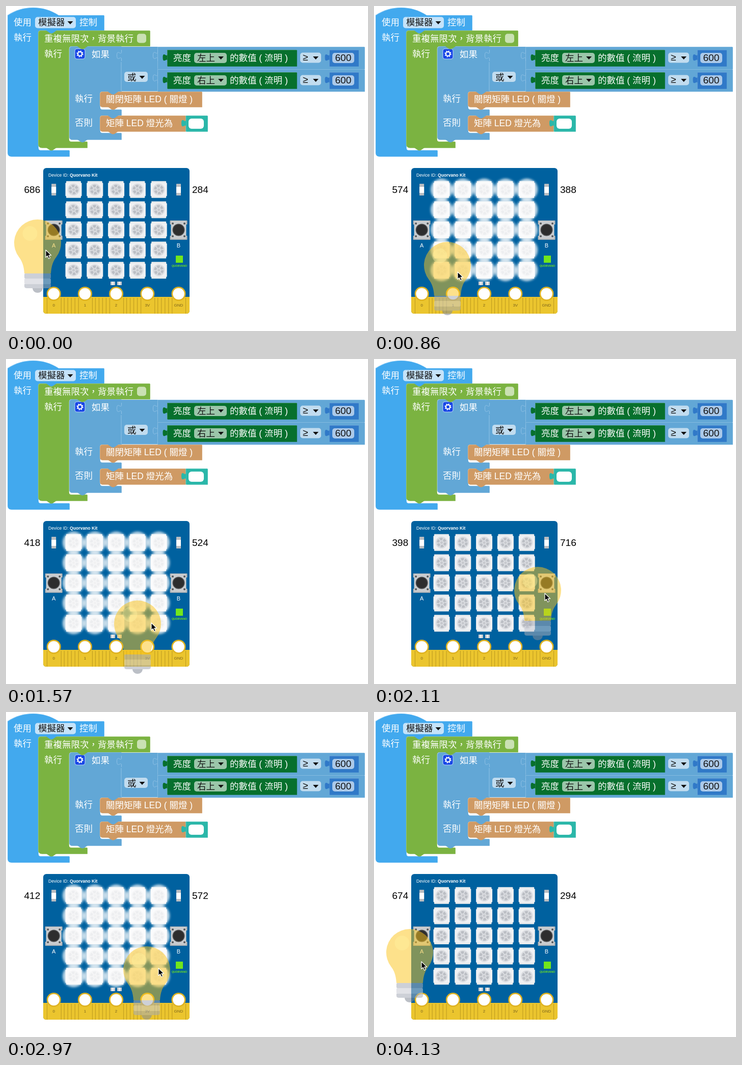
Animation, 710 px wide and 638 px high, one loop 4230 ms. Source, as an HTML page:

```html
<!DOCTYPE html>
<html lang="zh-Hant">
<head>
<meta charset="utf-8">
<style>
html, body { margin: 0; width: 100%; height: 100%; overflow: hidden; background: #fff; }
svg { display: block; font-family: "Liberation Sans", "Noto Sans CJK TC", "Noto Sans CJK", sans-serif; font-size: 17.5px; font-weight: 500; }
</style>
</head>
<body>
<svg id="stage" width="710" height="638" viewBox="0 0 710 638"></svg>
<script>
const BLUE = '#42a9ee', GREEN = '#7bb341', STEEL = '#62a7d6', FOREST = '#07702d',
      NUM = '#3079c8', TAN = '#cf9a64', TEAL = '#2bb7a9', BOARD = '#00619f', GOLD = '#ebc52e';

const rect = (x, y, w, h, fill, r = 0, extra = '') =>
  `<rect x="${x}" y="${y}" width="${w}" height="${h}" rx="${r}" fill="${fill}" ${extra}/>`;
const circle = (x, y, r, fill, extra = '') =>
  `<circle cx="${x}" cy="${y}" r="${r}" fill="${fill}" ${extra}/>`;
const path = (d, fill, extra = '') => `<path d="${d}" fill="${fill}" ${extra}/>`;
const text = (x, y, s, fill = '#fff', extra = '') =>
  `<text x="${x}" y="${y}" fill="${fill}" ${extra}>${s}</text>`;
const each = (list, draw) => list.map(draw).join('');

// Scratch-like block parts: a light upper-left rim on each block
const block = (d, fill) =>
  path(d, fill) + path(d, '#fff', 'opacity=".28"') + path(d, fill, 'transform="translate(.8 .8)"');
const boxBlock = (x, y, w, h, fill) => block(`M${x} ${y}h${w}v${h}h${-w}z`, fill);
const notch = (x, y, fill) => path(`M${x + 15} ${y - .6}h22l-8 5.6q-3 1.5-6 0z`, fill);
const plug = (x, y, fill, extra = '') =>
  path(`M${x + .5} ${y + 7}v4c0 9-9-7-9 7s9-1 9 7v4`, fill, extra);
const arrow = (x, y, fill = '#111') => path(`M${x} ${y}h11l-5.5 6z`, fill);
const wide = s => `&#160;(&#160;${s}&#160;)`;

function cBlock(x, top, right, head, footTop, bottom, footRight, fill, start) {
  return block(`${start || `M${x} ${top + 5}q0-5 5-5`}H${right}V${head}H${x + 65}q-5 0-5 5V${footTop - 5}
    q0 5 5 5H${footRight}V${bottom}H${x + 7}q-7 0-7-7z`, fill);
}

function comparison(y, place) {
  return boxBlock(297, y, 406, 43.4, STEEL) +
    plug(297, y - 1, 'none', 'stroke="#90c2e6"') +
    boxBlock(316, y + 6, 254, 32, FOREST) + plug(316, y + 3, FOREST) +
    text(328, y + 28, '亮度') +
    rect(369, y + 12, 64, 20, '#9bc6aa', 5) + text(375, y + 28, place, '#111') + arrow(416, y + 19) +
    text(439, y + 28, '的數值' + wide('流明')) +
    rect(577, y + 11.5, 41, 20, '#c1dcef', 5) + text(582, y + 27, '≥', '#111', 'font-size="19"') +
    arrow(602, y + 19) +
    boxBlock(634, y + 6, 57, 32, NUM) + plug(634, y + 3, NUM) +
    rect(640, y + 12, 43, 20, '#abc9e9', 5) + text(645.5, y + 28, '600', '#111', 'font-size="19"');
}

function blocks() {
  return cBlock(3, 18, 192, 47.5, 283, 295, 124, BLUE, 'M3 18c30-20 70-20 100 0') +
    text(15, 38, '使用') + rect(57, 21.5, 80, 22, '#c5e3fa', 5) +
    text(63, 38, '模擬器', '#111') + arrow(120.5, 30) + text(144, 38, '控制') + text(15, 68, '執行') +

    cBlock(63, 48, 282, 78.5, 266, 278, 159, GREEN) +
    text(75, 70, '重複無限次，背景執行') + rect(257, 54.5, 18, 18, '#cae1b3', 5) + text(75, 100, '執行') +

    block(`M124 84q0-5 5-5H226V167.5H189q-5 0-5 5V198q0 5 5 5H226V215H189q-5 0-5 5V244q0 5 5 5H226V262H129q-5 0-5-5z`, STEEL) +
    rect(226, 80, 72, 87.4, STEEL) +
    path('M226 167V110', 'none', 'stroke="#90c2e6"') +
    plug(226, 79, 'none', 'stroke="#90c2e6"') +
    rect(135, 84, 20, 20, '#1746e6', 4, 'stroke="#b9d2fa"') +
    circle(145, 94, 4, 'none', 'stroke="#fff" stroke-width="2"') +
    circle(145, 94, 5.6, 'none', 'stroke="#fff" stroke-width="2" stroke-dasharray="2.2"') +
    text(168, 100.5, '如果') +
    comparison(80, '左上') + comparison(124, '右上') +
    rect(232, 129, 46, 20, '#c1dcef', 5) + text(238, 146, '或', '#111') + arrow(261.5, 137) +
    text(135, 188, '執行') + text(135, 235, '否則') +

    block('M184 173q0-5 5-5H384V198H189q-5 0-5-5z', TAN) + text(196, 189, '關閉矩陣 LED' + wide('關燈')) +
    block('M184 220q0-5 5-5H352V246H189q-5 0-5-5z', TAN) + text(196, 236, '矩陣 LED 燈光為') +
    boxBlock(352.5, 215, 42.5, 31, TEAL) + plug(352.5, 212, TEAL) + rect(358, 221, 30, 20, '#fff', 6) +

    notch(63, 48, BLUE) + notch(124, 79, GREEN) + notch(184, 168, STEEL) + notch(184, 215, STEEL) +
    notch(184, 198, TAN) + notch(184, 246, TAN) + notch(124, 262, STEEL) + notch(63, 278, GREEN);
}

const cells = Array.from({ length: 25 }, (_, i) => [132.5 + 41.8 * (i % 5), 360.3 + 39.6 * Math.floor(i / 5)]);
const pins = ['0', '1', '2', '3V', 'GND'].map((name, i) => [93.7 + 61.2 * i, name]);

const button = (x, label) =>
  each([421, 451], y => rect(x - 17, y, 34, 8, '#aeb2b6', 1)) +
  rect(x - 15, 422, 30, 35, '#c9cccf', 1) +
  each([-11.5, 11.5], dx => each([427, 452], y => circle(x + dx, y, 2, '#55585b'))) +
  circle(x, 439.5, 12, '#4e4f51') + circle(x, 439.5, 10.5, '#2d2d2e') +
  text(x, 474, label, '#fff', 'text-anchor="middle" font-size="11"');

const sensor = x => rect(x - 4.5, 349, 9, 23, '#b9bdc2', .5) + rect(x - 4.5, 355, 9, 12, '#fff');
const groove = x => rect(x, 573, 1, 31, '#bd9920');

function board() {
  return rect(73, 318, 287, 286, BOARD, 6) +
    path('M73 571H360V598q0 6-6 6H79q-6 0-6-6z', GOLD) +
    groove(80) + groove(352) +
    each(pins.slice(0, 4), ([x]) => each([14, 20, 27, 34, 41, 48], dx => groove(x + dx))) +
    each(pins, ([x, name]) => circle(x, 565, 14, '#dfb322') + circle(x, 565, 11.3, '#fff') +
      text(x, 590, name, '#79621d', 'text-anchor="middle" font-size="8"')) +
    text(83, 334.5, 'Device ID: <tspan font-weight="bold">Quorvano Kit</tspan>', '#fff', 'font-size="8.6"') +
    sensor(93.7) + sensor(338.5) + button(93.7, 'A') + button(338.5, 'B') +
    each([205, 218], x => rect(x, 541, 9, 7, '#c8cbd0') + rect(x + 3, 541, 3, 7, '#eee')) +
    rect(333, 490, 14, 14, '#72e61c') +
    text(340, 512, 'QUORVANO', '#72e61c', 'text-anchor="middle" font-size="5.2" font-weight="bold"') +
    each(cells, ([x, y]) => `<use href="#led" x="${x}" y="${y}"/>`) +
    `<g id="glow" filter="url(#blur)">${each(cells, ([x, y]) => circle(x, y, 21.5, '#fff', 'opacity=".74"'))}</g>`;
}

const bulb = `<g id="bulb">
  ${path('M-36.5 74A46 46 0 1 1 36.5 74C31 81 27 90 26 106H-26C-27 90-31 81-36.5 74z', '#fbc41d', 'opacity=".51"')}
  ${circle(-15, 27.5, 14.5, '#fff2a0', 'opacity=".4"')}
  <g opacity=".55">
    ${rect(-26, 106, 52, 10, '#a6abb7', 2)}${rect(-26, 116, 52, 11, '#c9ccd5', 2)}
    ${path('M-26 127H26V131q0 4-5 4H-21q-5 0-5-4z', '#a6abb7')}
    ${path('M-10 135H10C9 147-9 147-10 135z', '#858b98')}
  </g></g>`;

const cursor = `<g id="cursor">${path('M0 0V14.5L3.3 11.4 5.8 17 8.4 15.8 6 10.4H10.6z', '#000',
  'stroke="#fff" stroke-width="1.2" stroke-linejoin="round"')}</g>`;

document.getElementById('stage').innerHTML = `<defs>
  <filter id="blur" x="-10%" y="-10%" width="120%" height="120%"><feGaussianBlur stdDeviation="2.2"/></filter>
  <g id="led">
    ${rect(-14.5, -16.5, 29, 33, '#e9ebed', 1)}${rect(-16, -13, 32, 26, '#f0f1f3', 1)}
    ${circle(0, 0, 11.8, '#dcdee2')}
    ${circle(0, 0, 7, 'none', 'stroke="#bbbec4" stroke-width="5" stroke-dasharray="5.33 2"')}
    ${circle(0, 0, 2.6, '#c7c9ce')}
  </g></defs>` + blocks() + board() +
  text(35.5, 367, '', '#000', 'id="left" font-size="19"') +
  text(365, 367, '', '#000', 'id="right" font-size="19"') + bulb + cursor;

const [glow, left, right, bulbEl, cursorEl] =
  ['glow', 'left', 'right', 'bulb', 'cursor'].map(id => document.getElementById(id));

// step, bulb x, bulb top, cursor x, cursor y, left lumen, right lumen
const REST = [62, 419, 78, 479, 686, 284];
const keys = [
  [0, ...REST],
  [5, 144, 463, 164, 522, 574, 388],
  [10, 215, 490, 240, 540, 448, 450],
  [13, 258, 474, 285, 518, 418, 524],
  [19, 321, 408, 335, 460, 398, 716],
  [24, 276, 460, 299, 503, 412, 572],
  [28, 215, 490, 237, 543, 448, 450],
  [31, 169, 475, 189, 537, 526, 408],
  [37, 70, 426, 93, 490, 674, 294],
  [38, ...REST],
];
const LOOP = 4230;

function stepAt(ms) {
  if (ms < 500) return 0;
  if (ms < 940) return 1 + Math.floor((ms - 500) / 90);
  if (ms < 2110) return 6 + Math.floor((ms - 940) / 90);
  if (ms < 2610) return 19;
  return ms < 4130 ? 20 + Math.floor((ms - 2610) / 90) : 37;
}

// The pointer is at rest at both ends of its swing.
function slope(i, c) {
  if (keys[i][0] % 19 === 0) return 0;
  const a = keys[i - 1], b = keys[i + 1];
  return (b[c] - a[c]) / (b[0] - a[0]);
}

function pose(step) {
  let i = 0;
  while (keys[i + 1][0] <= step) i++;
  const a = keys[i], b = keys[i + 1], span = b[0] - a[0], u = (step - a[0]) / span;
  const h = u * u * (3 - 2 * u);
  return REST.map((_, n) => {
    const c = n + 1;
    return a[c] + (b[c] - a[c]) * h +
      span * u * (1 - u) * (slope(i, c) * (1 - u) - slope(i + 1, c) * u);
  });
}

const even = v => 2 * Math.ceil(v / 2);

function render(ms) {
  const [bx, by, cx, cy, l, r] = pose(stepAt(ms % LOOP));
  bulbEl.setAttribute('transform', `translate(${Math.round(bx)} ${Math.round(by)})`);
  cursorEl.setAttribute('transform', `translate(${Math.round(cx)} ${Math.round(cy)})`);
  left.textContent = even(l);
  right.textContent = even(r);
  glow.setAttribute('display', l >= 600 || r >= 600 ? 'none' : 'inline');
}

const startTime = performance.now();
function tick() {
  render(performance.now() - startTime);
  requestAnimationFrame(tick);
}
tick();
</script>
</body>
</html>
```
